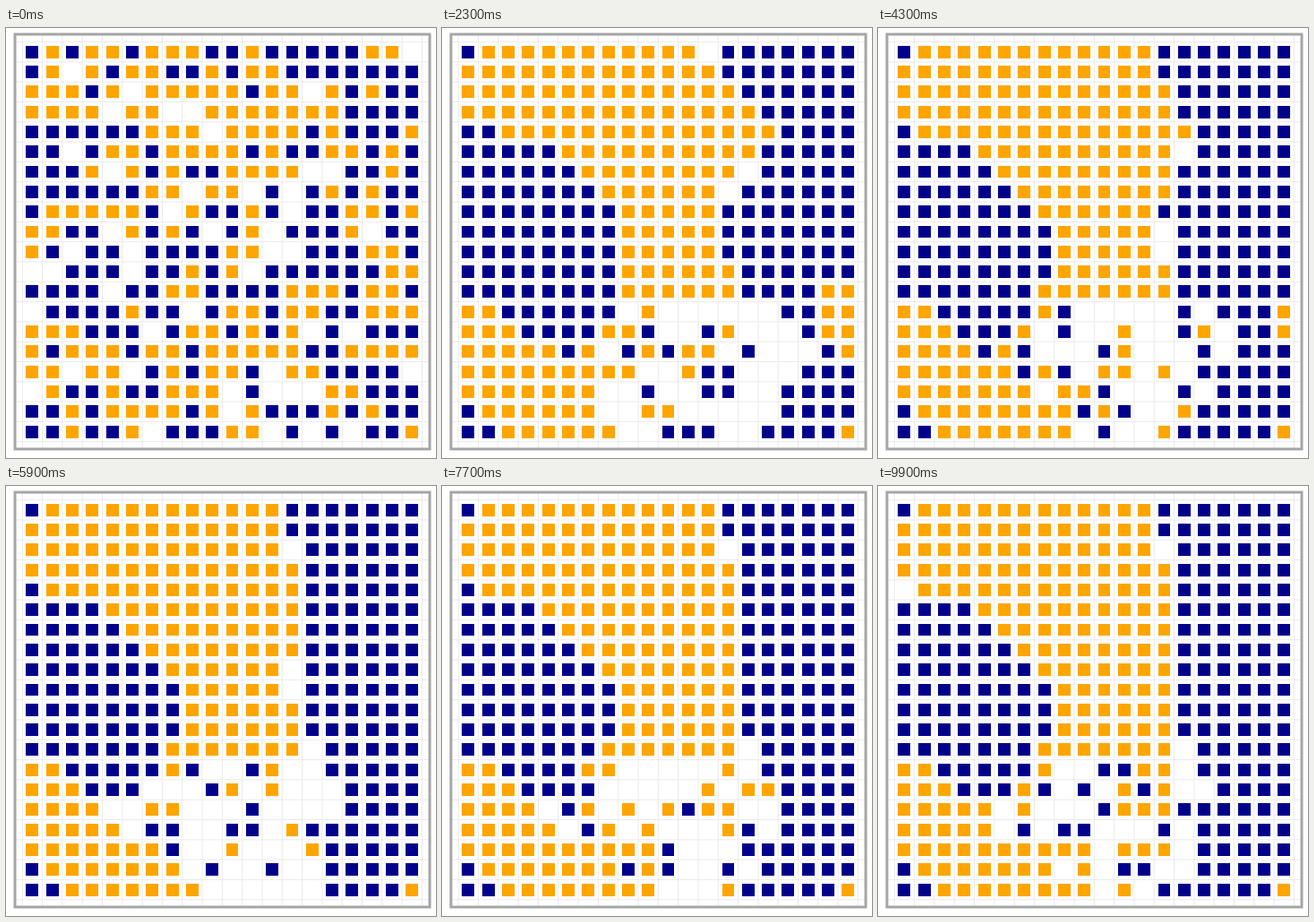
A matplotlib script that plays this animation: 480 by 480 pixels, repeating every 10 s.

```python
import matplotlib.pyplot as plt
import numpy as np
from matplotlib.animation import FuncAnimation
from matplotlib.collections import PolyCollection
from matplotlib.patches import Rectangle

N, STEPS = 20, 51
EMPTY, BLUE, ORANGE = 0, 1, 2
COLORS = np.array([(0, 0, 0, 0), (0, 0, 139 / 255, 1), (1, 165 / 255, 0, 1)])
X0, Y0, PITCH, SIZE = 22.48, 19.77, 22.31, 13.86
SORTED = 7      # step by which the districts have formed
MIXED_ROW = 13  # the restless zone starts here

rng = np.random.default_rng(11)
idx = np.arange(N)
row, mid = idx[:, None], idx + 0.5

# District edges as (row, column) points, early and late.
RIGHT = ([(0, 12), (4, 17.2), (8, 12.3), (12, 14), (15, 19), (19, 15)],
         [(0, 13), (4, 13.8), (11, 13.8), (14, 16), (19, 14)])
LEFT = ([(3.5, 0), (5, 5), (8, 8.5), (14, 8), (16, 0)],
        [(3.5, 0), (5, 4), (10, 8.5), (14, 5.5), (16, 0)])
SOUTH = ([(12, 0), (14, 3), (16, 7), (19, 7)],
         [(12, 0), (14, 3.5), (16, 5), (19, 10)])


def edge(early_late, t):
    early, late = (np.interp(idx, *zip(*pts)) for pts in early_late)
    return (early + (late - early) * t)[:, None]


def crowd(empty, blue):
    return rng.choice(3, (N, N), p=[empty, blue, 1 - empty - blue])


def homesteads(grid):
    """Corner cells that never move."""
    grid[0, 0] = grid[18, 0] = BLUE
    grid[19, :2] = BLUE
    grid[19, 19] = ORANGE
    return grid


def districts(n):
    """Kind that belongs in each cell, and the mask of the restless zone."""
    t = 1 - np.exp(-max(n - SORTED, 0) / 13)
    right, left, south = (edge(e, t) for e in (RIGHT, LEFT, SOUTH))
    want = np.where(mid < right, ORANGE, BLUE)
    want[np.abs(mid - right) < 0.12] = EMPTY
    mixed = (row >= MIXED_ROW) & (mid < right)
    for kind, limit in ((BLUE, left), (ORANGE, south)):
        want[mid < limit] = kind
        mixed &= mid >= limit
    # An orange pocket at the right side shrinks away.
    pocket = np.hypot(idx - 19, row - 13.3) < 3 * (1 - n / 30)
    want[pocket] = ORANGE
    return want, mixed & ~pocket


def lonely(grid):
    """Cells where most neighbours are of the other kind."""
    pad = np.pad(grid, 1)
    near = [pad[1 + dy:1 + dy + N, 1 + dx:1 + dx + N]
            for dy in (-1, 0, 1) for dx in (-1, 0, 1) if dx or dy]
    like = sum(k == grid for k in near)
    other = sum((k != grid) & (k != EMPTY) for k in near)
    return other > like


def simulate():
    home, _ = districts(0)
    grid = np.where(rng.random((N, N)) < 0.3, home, crowd(0.17, 0.46))
    states = [homesteads(grid)]
    for n in range(1, STEPS):
        want, mixed = districts(n)
        luck = rng.random((N, N))
        settle = 0.3 + 0.1 * n
        moved = np.where((grid == want) | (luck < settle), want, crowd(0.2, 0.4))
        moved[lonely(moved) & (luck < 0.15)] = EMPTY
        churn = np.where(luck < 0.5, crowd(0.5, 0.26), grid)
        grid = homesteads(np.where(mixed, churn, moved))
        states.append(grid)
    return states


states = simulate()

fig = plt.figure(figsize=(4.8, 4.8), dpi=100, facecolor="white")
ax = fig.add_axes([0, 0, 1, 1])
ax.set(xlim=(0, 480), ylim=(480, 0))
ax.axis("off")

ticks = np.arange(N + 1) * PITCH + (SIZE - PITCH) / 2
grid_style = dict(color="#ebebeb", lw=0.72, zorder=1, snap=False)
ax.vlines(X0 + ticks, 7, 470, **grid_style)
ax.hlines(Y0 + ticks, 10, 473, **grid_style)
ax.add_patch(Rectangle((10, 7), 463, 463, fill=False, ec="#a6a6a6", lw=2.16,
                       zorder=3, snap=False))


def square(x, y):
    x0, x1, y0, y1 = np.round([x, x + SIZE, y, y + SIZE])
    return [(x0, y0), (x1, y0), (x1, y1), (x0, y1)]


squares = PolyCollection([square(X0 + PITCH * c, Y0 + PITCH * r) for r in idx for c in idx],
                         linewidths=0, edgecolors="none", antialiased=False, zorder=2)
ax.add_collection(squares, autolim=False)


def draw(frame):
    squares.set_facecolor(COLORS[states[(frame + 1) // 2].ravel()])
    return [squares]


anim = FuncAnimation(fig, draw, frames=100, interval=100, repeat=True, repeat_delay=0)
plt.show()
```
